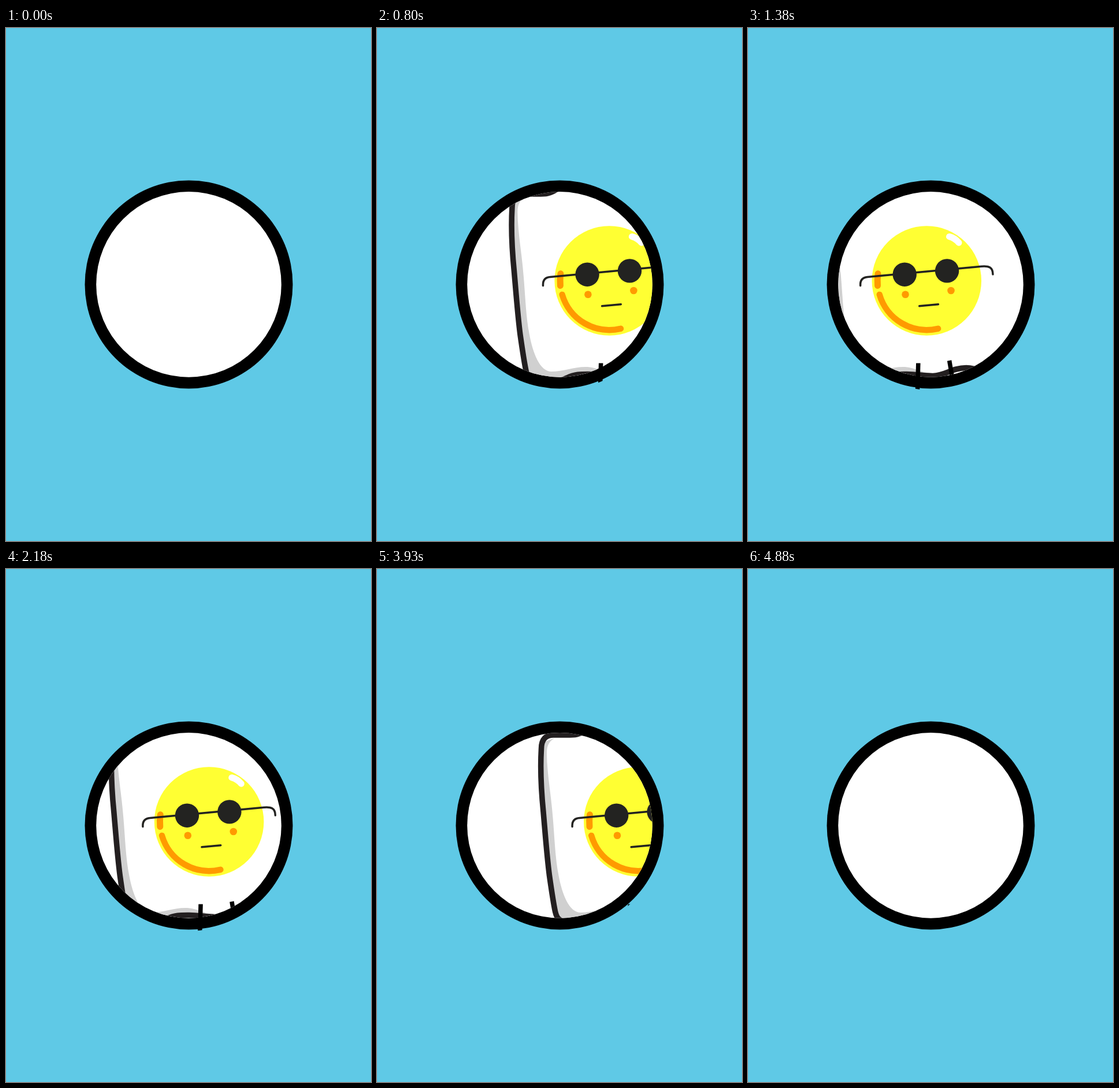
Write an HTML page with a canvas that moves like this. It is 632 by 887 pixels and loops after 4980 ms.

```html
<!DOCTYPE html>
<html lang="en">
<head>
<meta charset="utf-8">
<title>Egg in a porthole</title>
<style>
html, body { margin: 0; width: 100%; height: 100%; overflow: hidden; background: #5fc9e6; }
canvas { display: block; width: 100%; height: 100%; }
</style>
</head>
<body>
<canvas id="stage" width="632" height="887"></canvas>
<script>
const ctx = document.getElementById('stage').getContext('2d');

const LOOP = 4980;
const HOLE = { x: 316.5, y: 443.4, inner: 160.3, outer: 180 };
const INK = '#231f20', LENS = '#232321', ORANGE = '#ff9a00';

// Start times of the held poses; the egg is hidden in the first and the last.
const TIMES = [0, 100, 200, 300, 400, 500, 600, 700, 800, 900, 1030, 1180, 1380,
  1680, 2180, 2730, 3180, 3580, 3930, 4230, 4480, 4580, 4680, 4780, 4880];
const CENTRED = 12;

// Horizontal shift of the egg: even steps that end at the centre.
function shiftAt(t) {
  const i = TIMES.findLastIndex(start => start <= t);
  if (i === 0 || i === TIMES.length - 1) return null;
  const away = Math.abs(i - CENTRED);
  return away === 0 ? 0 : 17 + 25.3 * (away - 1);
}

function disc(x, y, r, color) {
  ctx.fillStyle = color;
  ctx.beginPath();
  ctx.arc(x, y, r, 0, Math.PI * 2);
  ctx.fill();
}

function stroke(path, color, width, cap = 'round') {
  ctx.strokeStyle = color;
  ctx.lineWidth = width;
  ctx.lineCap = cap;
  ctx.lineJoin = 'round';
  ctx.stroke(new Path2D(path));
}

// Draws inside a circle of radius r, moved sideways by dx.
function inHole(r, dx, draw) {
  ctx.save();
  ctx.beginPath();
  ctx.arc(HOLE.x, HOLE.y, r, 0, Math.PI * 2);
  ctx.clip();
  ctx.translate(dx, 0);
  draw();
  ctx.restore();
}

const SHADE = new Path2D(`M165 292 C155 297 150 305 150.5 320
  C151 355 158 390 161 430 C164 465 165 500 171 530
  C177 562 189 594 209 594 C230 594 248 586 268 586
  C290 586 298 597 322 597 C332 597 338 594 346 592
  L346 600 L322 602 L275 598 L205 614 L172 606
  C157 560 150 480 144.5 420 C140 365 139 320 143 300 Z`);

const OUTLINE = `M222 276 C207 288 196 287 180 287 L162 287
  C150 287 141 293 141 311 C139 345 141 385 144.5 420
  C148 460 151 500 155 530 C159 558 162 578 165 592
  C168 606 173 607 182 611 C205 620 222 611 236 605
  C250 598 262 598.5 275 598.5 C292 598.5 304 601.5 320 601.5
  C342 601 352 588 378 587.5 C388 587.5 394 589 404 594`;

const ARMS = `M194.6 445.5 C194 436 198 431.3 207 430.6 L404 412.2
  C417 410.8 424 414 424 426`;

function drawFace() {
  disc(309.3, 437, 94.8, '#ffff33');
  stroke('M225 424.8 Q223.6 435 224.5 445.5', ORANGE, 11);
  stroke('M227.7 460.9 A85 85 0 0 0 329.1 519.8', ORANGE, 10.5);
  stroke('M348.5 360.7 Q358 363 365 371.3', '#fff', 11);
  disc(272.5, 460.8, 6.3, ORANGE);
  disc(351.5, 454, 6.3, ORANGE);
  stroke('M296.7 480.8 L329.5 477.7', LENS, 3.4);
  stroke(ARMS, LENS, 3.5);
  disc(271.2, 426.2, 20.7, LENS);
  disc(344.6, 419.9, 20.7, LENS);
}

function drawEgg() {
  ctx.fillStyle = '#d0d0d0';
  ctx.fill(SHADE);
  stroke(OUTLINE, INK, 9.6);
  drawFace();
  stroke('M348.6 575 L354 606', '#000', 7.5, 'butt');
}

function render(t) {
  ctx.fillStyle = '#5fc9e6';
  ctx.fillRect(0, 0, 632, 887);
  disc(HOLE.x, HOLE.y, HOLE.outer, '#000');
  disc(HOLE.x, HOLE.y, HOLE.inner, '#fff');

  const dx = shiftAt(t);
  if (dx === null) return;
  inHole(HOLE.inner, dx, drawEgg);
  // The near leg pokes slightly past the rim.
  inHole(HOLE.outer + 2.5, dx, () =>
    stroke('M294.8 579.5 L293.4 630', '#000', 7.5, 'butt'));
}

const begin = performance.now();
function tick() {
  render((performance.now() - begin) % LOOP);
  requestAnimationFrame(tick);
}
tick();
</script>
</body>
</html>
```
